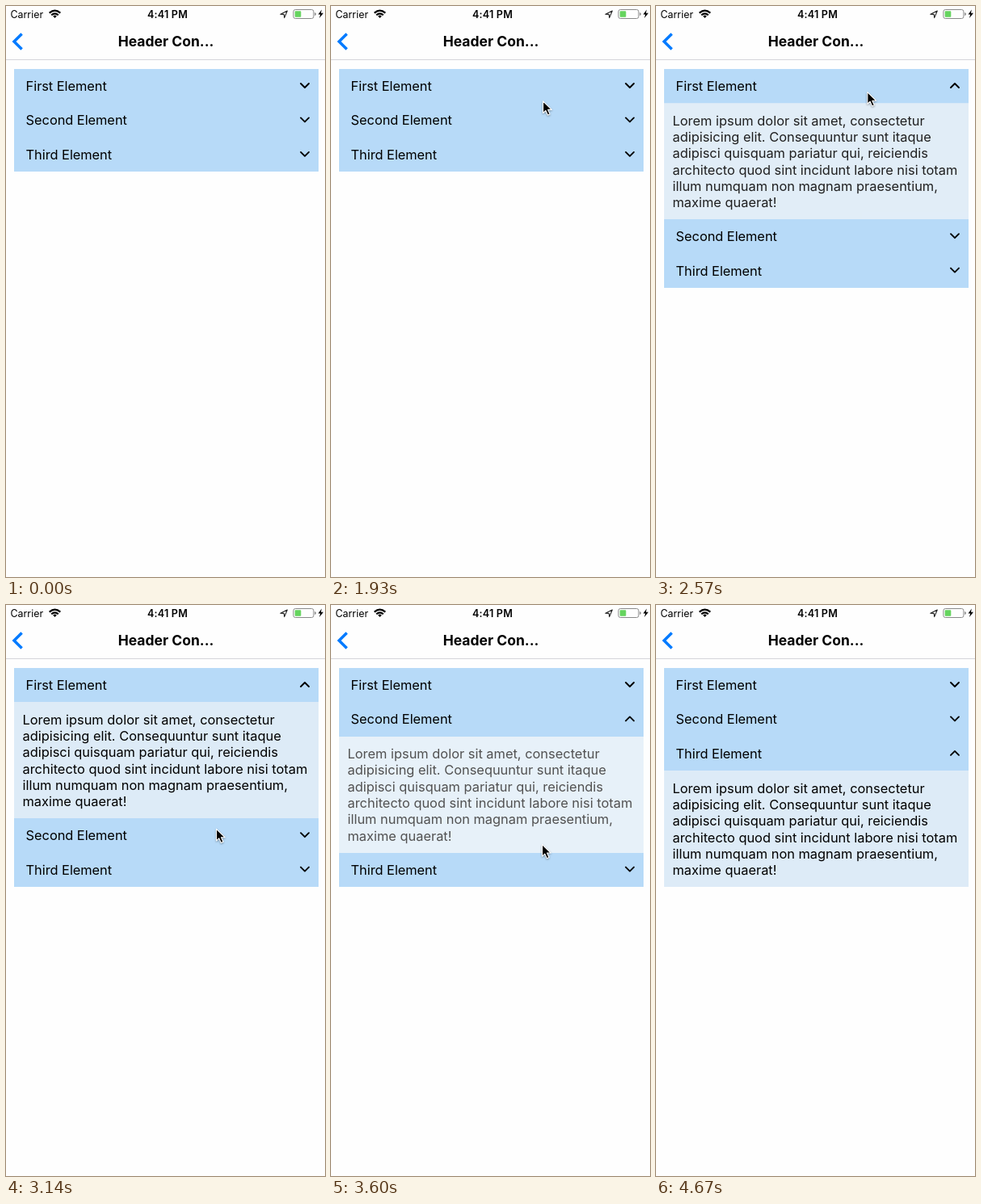
An HTML page that plays this animation: 395x707 px, repeating every 4860 ms.

```html
<!DOCTYPE html>
<html lang="en">
<head>
<meta charset="utf-8">
<title>Accordion</title>
<style>
  html, body { margin: 0; width: 100%; height: 100%; overflow: hidden; background: #fefefe; }
  svg { display: block; width: 395px; height: 707px; font-family: Inter, "Noto Sans", sans-serif; }
  .row, .copy { font-size: 16.4px; }
  .row { letter-spacing: -.05px; }
  .row rect, #panel rect { shape-rendering: crispEdges; }
  .chev { fill: none; stroke: #000; stroke-width: 1.9; stroke-linecap: round; stroke-linejoin: round; }
</style>
</head>
<body>
<svg viewBox="0 0 395 707">
  <rect width="395" height="707" fill="#fefefe"/>

  <text x="5.5" y="14.5" font-size="12.4">Carrier</text>
  <g fill="none" stroke="#000" stroke-width="2.2">
    <path d="M53.7 8.6Q60.5 2.6 67.3 8.6M56.2 11.2Q60.5 7.4 64.8 11.2"/>
    <path d="M58.2 12.4Q60.5 10.6 62.8 12.4L60.5 15Z" fill="#000" stroke="none"/>
  </g>
  <text x="200" y="14.5" font-size="12.6" font-weight="600" text-anchor="middle" letter-spacing=".2">4:41 PM</text>
  <path d="M339.8 10.2L348.3 6L344.7 14.6L344.2 10.4Z" fill="none" stroke="#222" stroke-width="1.1" stroke-linejoin="round"/>
  <rect x="355.9" y="4.5" width="25" height="11" rx="2.4" fill="none" stroke="#8a8a8a"/>
  <rect x="357.7" y="6.2" width="7.6" height="7.6" rx=".8" fill="#65d45e"/>
  <path d="M382.2 8Q384 8.4 384 10T382.2 12Z" fill="#8a8a8a"/>
  <path d="M390.8 4.6L386.6 10.6H389.2L388 15L393 8.8H390Z"/>

  <path d="M19.6 34.4L10 44L19.6 53.6" fill="none" stroke="#007aff" stroke-width="3.5"/>
  <text x="198" y="49.6" font-size="17.5" font-weight="700" text-anchor="middle">Header Con...</text>
  <path d="M0 66.5H395" stroke="#d5d5da"/>

  <g id="rows"></g>
  <g id="panel">
    <rect x="10" width="377" height="143.7" fill="#ddebf7"/>
    <g id="copy" class="copy"></g>
  </g>
  <path id="cursor" d="M0 0V14.6L3.3 11.6L5.8 17.2L8.5 16L6 10.5H10.7Z" stroke="#fff" stroke-width="1.1" stroke-linejoin="round" style="filter:drop-shadow(0 1px 1px rgba(0,0,0,.35))"/>
</svg>
<script>
const LOOP = 4860, TOP = 78, ROW = 42.45, BODY = 143.7, LINE = 20.35;
const APPEAR = 1470, LEAVE = 4670;
const taps = [2220, 3340, 4000];
const titles = ["First Element", "Second Element", "Third Element"];
const copy = [
  "Lorem ipsum dolor sit amet, consectetur",
  "adipisicing elit. Consequuntur sunt itaque",
  "adipisci quisquam pariatur qui, reiciendis",
  "architecto quod sint incidunt labore nisi totam",
  "illum numquam non magnam praesentium,",
  "maxime quaerat!"
];

const easeInOut = p => p < .5 ? 2 * p * p : 1 - 2 * (1 - p) * (1 - p);
const easeOut = p => 1 - (1 - p) ** 3;
const clamp = p => Math.max(0, Math.min(1, p));

// pointer moves; bow bends the path sideways
const home = { x: 243.5, y: 690 };
const glides = [
  { from: 1560, to: 1990, x: 266, y: 95.5, bow: -22, ease: easeInOut },
  { from: 2450, to: 3140, x: 260.5, y: 277.3, bow: -20, ease: easeInOut },
  { from: 3340, to: 3860, x: 262.5, y: 315.5, bow: 0, ease: easeInOut },
  { from: 4060, to: LEAVE, x: 385, y: 710, bow: 0, ease: easeOut }
];

const $ = id => document.getElementById(id);
const add = (parent, tag, attrs, text = "") => {
  const el = document.createElementNS("http://www.w3.org/2000/svg", tag);
  for (const k in attrs) el.setAttribute(k, attrs[k]);
  el.textContent = text;
  return parent.appendChild(el);
};
const move = (el, x, y) => el.setAttribute("transform", `translate(${x} ${y})`);

const rows = titles.map(title => {
  const g = add($("rows"), "g", { class: "row" });
  add(g, "rect", { x: 10, width: 377, height: ROW + .1, fill: "#b7daf8" });
  add(g, "text", { x: 24.6, y: 27 }, title);
  return { g, chev: add(g, "path", { class: "chev" }) };
});
copy.forEach((line, i) => add($("copy"), "text", { x: 20.5, y: 27.2 + i * LINE }, line));

function pointer(t) {
  let { x, y } = home;
  for (const g of glides) {
    const p = g.ease(clamp((t - g.from) / (g.to - g.from)));
    x += (g.x - x) * p + g.bow * Math.sin(Math.PI * p);
    y += (g.y - y) * p;
  }
  return [x, y];
}

function draw(time) {
  // the screen stalls briefly after the last tap
  const t = time > 4260 && time < 4410 ? 4260 : time;
  const open = taps.filter(tap => t >= tap).length - 1;
  rows.forEach(({ g, chev }, i) => {
    move(g, 0, TOP + i * ROW + (open >= 0 && i > open ? BODY : 0));
    chev.setAttribute("d", i === open ? "M365 23L370 18L375 23" : "M365 18L370 23L375 18");
  });

  const panel = $("panel");
  panel.style.display = open < 0 ? "none" : "";
  if (open >= 0) {
    move(panel, 0, TOP + (open + 1) * ROW);
    panel.style.opacity = .3 + .7 * easeInOut(clamp((t - taps[open]) / 500));
  }

  $("cursor").style.display = t >= APPEAR && t < LEAVE ? "" : "none";
  move($("cursor"), ...pointer(t));
}

const start = performance.now();
function tick() {
  draw((performance.now() - start) % LOOP);
  requestAnimationFrame(tick);
}
tick();
</script>
</body>
</html>
```
